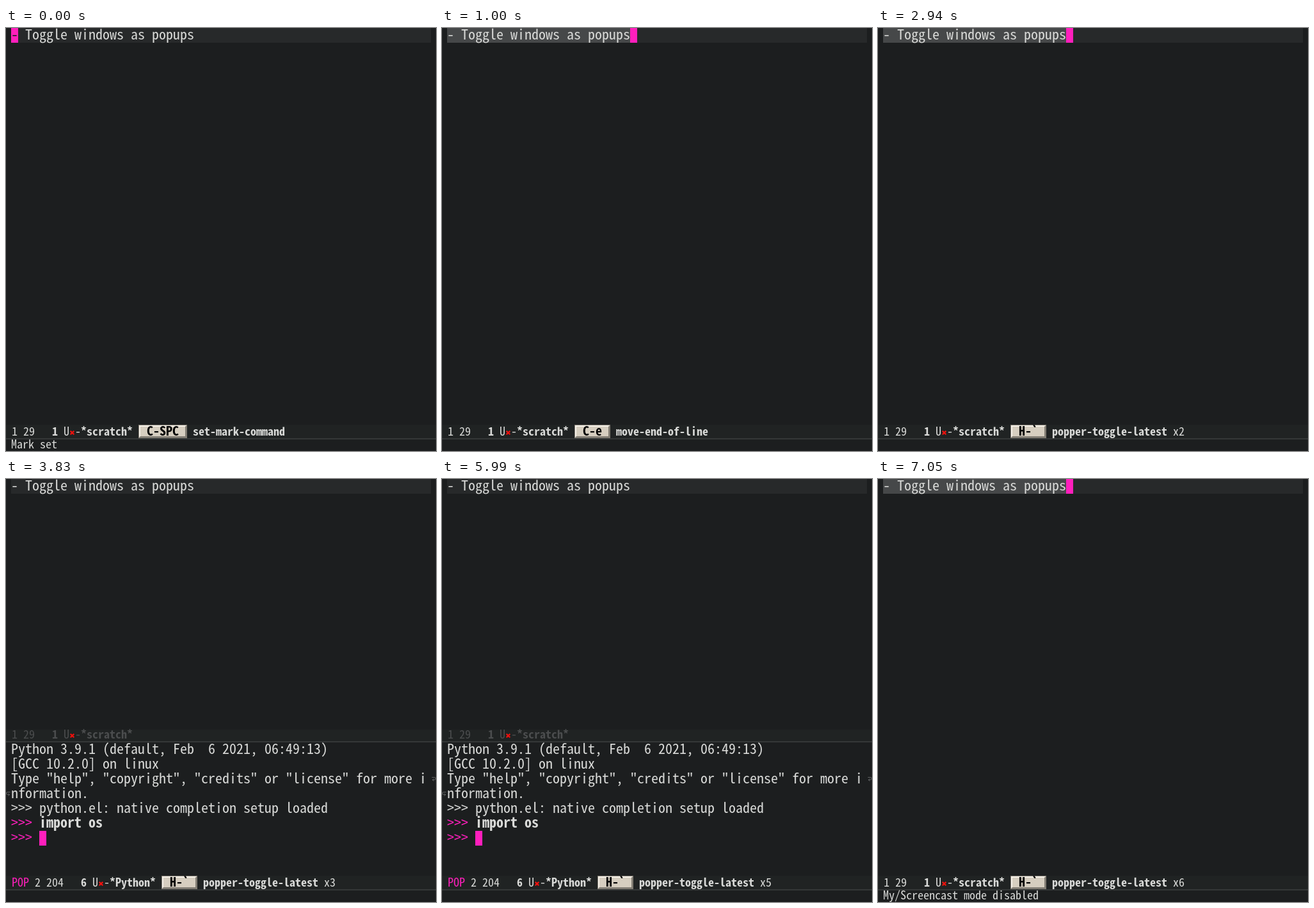
Animation of 672x660 px, one loop 8.51 s. Source, as an HTML page with a canvas:

```html
<!DOCTYPE html>
<html lang="en">
<head>
<meta charset="utf-8">
<title>Toggle windows as popups</title>
<style>
html, body { margin: 0; width: 100%; height: 100%; overflow: hidden; background: #1c1e1f; }
canvas { display: block; }
</style>
</head>
<body>
<canvas id="stage" width="672" height="660"></canvas>
<script>
const ctx = document.getElementById('stage').getContext('2d');
const FAMILY = '"Noto Sans Mono CJK JP", "Noto Sans Mono", "DejaVu Sans Mono", monospace';
const BG = '#1c1e1f', FG = '#d9dad8', PINK = '#ff1fbc', RED = '#f5100c',
  BAR = '#202323', LINE = '#353838', DIM = '#4b4d4e', HL = '#27292a', REGION = '#464849';
const LOOP = 8510, ROW = 23, BIG = 11, KEY = 10, SMALL = 9;
const TITLE = '- Toggle windows as popups';
const TOGGLE = ['H-`', 'popper-toggle-latest'];

// Font size follows from the width of one character cell.
ctx.font = '100px ' + FAMILY;
const advance = ctx.measureText('0').width / 100;

const steps = [
  { at: 0, cmd: ['C-SPC', 'set-mark-command'], echo: 'Mark set' },
  { at: 1000, cmd: ['C-e', 'move-end-of-line'], region: true },
  { at: 2040, cmd: TOGGLE, popup: true },
  { at: 2940, cmd: TOGGLE, count: 'x2', region: true },
  { at: 3830, cmd: TOGGLE, count: 'x3', popup: true },
  { at: 4890, cmd: TOGGLE, count: 'x4', region: true },
  { at: 5990, cmd: TOGGLE, count: 'x5', popup: true },
  { at: 7050, cmd: TOGGLE, count: 'x6', region: true, echo: 'My/Screencast mode disabled' }
];

function rect(x, y, w, h, color) {
  ctx.fillStyle = color;
  ctx.fillRect(x, y, w, h);
}

// Draws a run of text and returns the x where the next run starts.
function text(str, x, y, color = FG, cell = SMALL, bold = false) {
  ctx.font = `${bold ? 'bold ' : ''}${cell / advance}px ${FAMILY}`;
  ctx.fillStyle = color;
  ctx.fillText(str, x, y);
  return x + str.length * cell;
}

// Raised button: outer line, highlight, shadow, face.
function keyCap(label, x) {
  const w = (label.length + 2) * KEY + 6, top = 619, h = 21, shadow = '#827d74';
  rect(x, top, w, h, shadow);
  rect(x + 1, top + 1, w - 1, h - 1, '#f6f1e8');
  ctx.fillStyle = shadow;
  ctx.beginPath();
  ctx.moveTo(x, top + h);
  ctx.lineTo(x + 3, top + h - 3);
  ctx.lineTo(x + w - 3, top + 3);
  ctx.lineTo(x + w, top);
  ctx.lineTo(x + w, top + h);
  ctx.fill();
  rect(x + 3, top + 3, w - 6, h - 6, '#d6cec0');
  text(label, x + 3 + KEY, 636, '#000', KEY, true);
  return x + w;
}

// The modified-buffer mark, one cell wide.
function cross(x, y) {
  const cx = x + SMALL / 2, cy = y - 4.5, r = 2.8;
  ctx.strokeStyle = RED;
  ctx.lineWidth = 2.2;
  ctx.beginPath();
  for (const side of [-1, 1]) {
    ctx.moveTo(cx - r, cy - side * r);
    ctx.lineTo(cx + r, cy + side * r);
  }
  ctx.stroke();
  return x + SMALL;
}

function bufferInfo(x, y, position, number, name, color = FG) {
  x = text(position + '   ', x, y, color);
  x = text(number + ' ', x, y, color, SMALL, true);
  x = text('U', x, y, color);
  x = cross(x, y);
  x = text('-', x, y, color);
  return text(name, x, y, color, SMALL, true);
}

function modeLine({ cmd, count, popup }) {
  rect(0, 619, 672, 21, BAR);
  rect(0, 640, 672, 2, LINE);
  let x = popup
    ? bufferInfo(text('POP ', 9, 636, PINK), 636, '2 204', 6, '*Python*')
    : bufferInfo(9, 636, '1 29', 1, '*scratch*');
  x = keyCap(cmd[0], x + SMALL);
  x = text(cmd[1], x + SMALL, 636, FG, SMALL, true);
  if (count) text(count, x + SMALL, 636);
}

// Small curved arrow marking a wrapped line; dir -1 mirrors it.
function wrapMark(x, y, dir) {
  ctx.save();
  ctx.translate(x, y);
  ctx.scale(dir, 1);
  ctx.strokeStyle = '#626465';
  ctx.lineWidth = 1;
  ctx.beginPath();
  ctx.moveTo(-3, -2.5);
  ctx.lineTo(1, -2.5);
  ctx.quadraticCurveTo(3, -2.5, 3, -0.5);
  ctx.quadraticCurveTo(3, 1.5, 0, 1.5);
  ctx.lineTo(-2, 1.5);
  ctx.moveTo(0, -0.5);
  ctx.lineTo(-2, 1.5);
  ctx.lineTo(0, 3.5);
  ctx.stroke();
  ctx.restore();
}

function pythonWindow() {
  rect(0, 391, 672, 18, BAR);
  rect(0, 409, 672, 2, LINE);
  bufferInfo(9, 405, '1 29', 1, '*scratch*', DIM);
  const base = row => 411 + row * ROW + 18;
  [
    'Python 3.9.1 (default, Feb  6 2021, 06:49:13)',
    '[GCC 10.2.0] on linux',
    'Type "help", "copyright", "credits" or "license" for more i',
    'nformation.',
    '>>> python.el: native completion setup loaded'
  ].forEach((str, row) => text(str, 8, base(row), FG, BIG));
  text('import os', text('>>> ', 8, base(5), PINK, BIG), base(5), FG, BIG, true);
  rect(text('>>> ', 8, base(6), PINK, BIG), 549, BIG, ROW, PINK);
  wrapMark(668.5, 468, 1);
  wrapMark(3.5, 491, -1);
}

function draw(step) {
  rect(0, 0, 672, 660, BG);
  rect(8, 0, 656, ROW, HL);
  const end = 8 + TITLE.length * BIG;
  const onDash = !step.region && !step.popup;
  if (step.region) {
    rect(8, 0, end - 8, ROW, REGION);
    rect(end, 0, BIG, ROW, PINK);
  } else if (onDash) {
    rect(8, 0, BIG, ROW, PINK);
  }
  text(TITLE.slice(1), text('-', 8, 18, onDash ? BG : FG, BIG), 18, FG, BIG);
  if (step.popup) pythonWindow();
  modeLine(step);
  if (step.echo) text(step.echo, 8, 656);
}

const start = performance.now();
function frame() {
  const t = (performance.now() - start) % LOOP;
  draw(steps.findLast(step => step.at <= t));
  requestAnimationFrame(frame);
}
frame();
</script>
</body>
</html>
```
